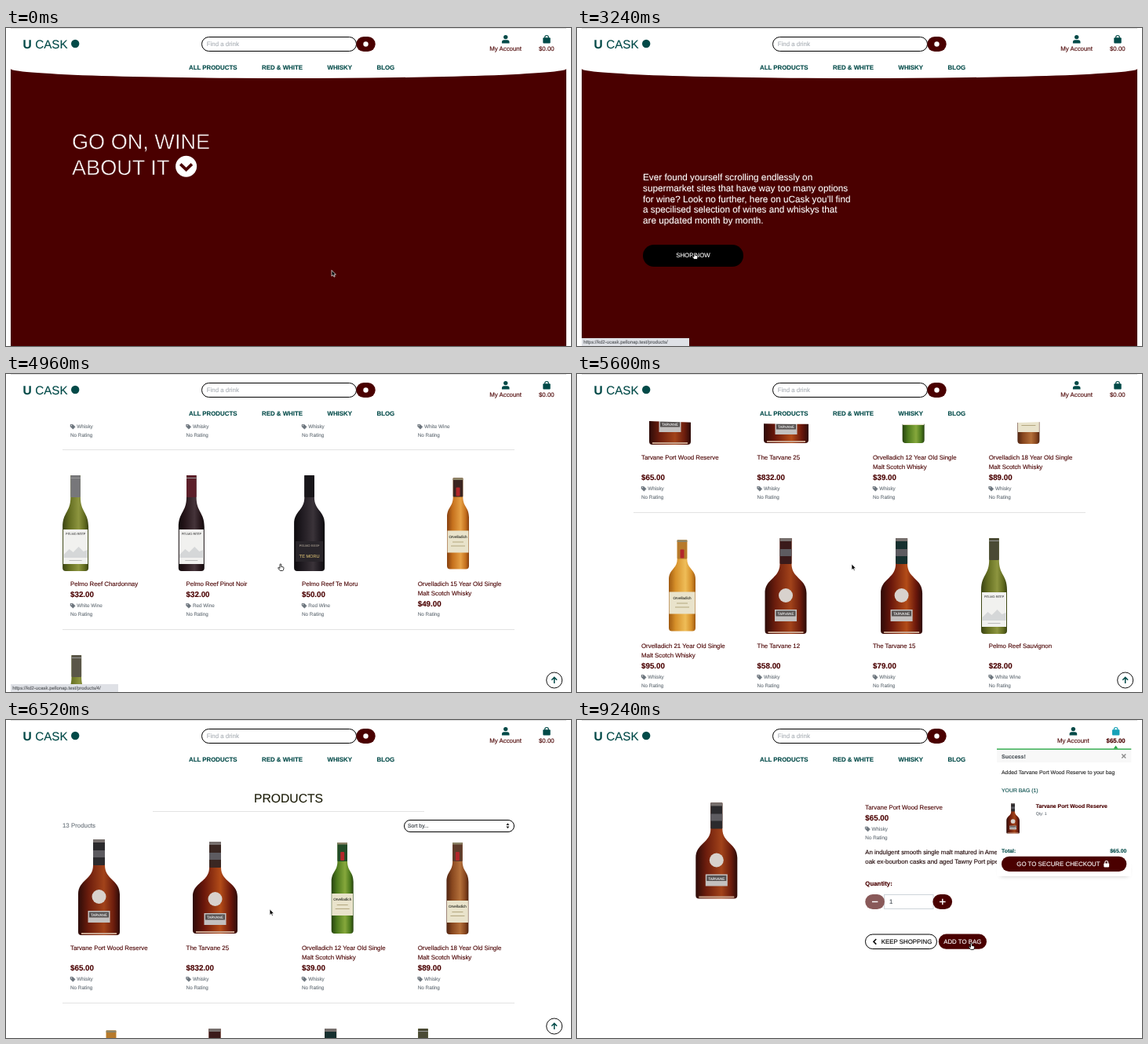
These frames come from a looping animation (720x405 px, 9760 ms). An HTML page:

```html
<!DOCTYPE html>
<html lang="en">
<head>
<meta charset="utf-8">
<title>Wine shop</title>
<style>
  html, body { margin: 0; width: 100%; height: 100%; overflow: hidden; background: #fff; }
  svg { display: block; width: 100vw; height: 100vh; }
  text { font-family: "Liberation Sans", Arial, sans-serif; text-rendering: geometricPrecision; white-space: pre; }
</style>
</head>
<body>
<svg id="stage" viewBox="0 0 720 405" xmlns="http://www.w3.org/2000/svg"></svg>
<script>
const LOOP = 9760, STEP = 40;
const MAROON = '#4a0000', TEAL = '#024a48', GREY = '#6c757d';
const BASE = 7.87, SMALL = 6.88, TINY = 6.35;
const SITE = 'https://kd2-ucask.pellonap.test/';

// ---------- drawing helpers ----------
const glyphs = (x, y, size, fill, str, stroke, width, more) =>
  `<text x="${x}" y="${y}" font-size="${size}" fill="${fill}" stroke="${stroke}" stroke-width="${width}" ${more}>${str}</text>`;
const text = (x, y, size, fill, str, more = '') => glyphs(x, y, size, fill, str, fill, .12, more);
const bold = (x, y, size, fill, str, more = '') => text(x, y, size, fill, str, 'font-weight="700" ' + more);
const light = (x, y, size, fill, bg, str) => glyphs(x, y, size, fill, str, bg, .5, '');
const rect = (x, y, w, h, fill, more = '') =>
  `<rect x="${x}" y="${y}" width="${w}" height="${h}" fill="${fill}" ${more}/>`;
const pill = (x, y, w, h, fill, more = '') => rect(x, y, w, h, fill, `rx="${h / 2}" ${more}`);
const disc = (x, y, r, fill, more = '') => `<circle cx="${x}" cy="${y}" r="${r}" fill="${fill}" ${more}/>`;
const path = (d, fill, more = '') => `<path d="${d}" fill="${fill}" ${more}/>`;
const line = (d, colour, width) => path(d, 'none', `stroke="${colour}" stroke-width="${width}"`);
const at = (x, y, body, scale = 1) => `<g transform="translate(${x} ${y}) scale(${scale})">${body}</g>`;
const group = (id, body) => `<g id="${id}">${body}</g>`;
const rule = (x1, x2, y) => rect(x1, y, x2 - x1, 1, '#e3e3e3');

// ---------- bottles ----------
const GLASS = {
  red: ['#2c0b08', '#6c1d0d', '#a2431a'], ruby: ['#2e0a08', '#6a170b', '#b34c18'],
  green: ['#26420f', '#4d7a1d', '#86a83c'], brown: ['#4f2411', '#88471f', '#b4703a'],
  amber: ['#87400f', '#c5701d', '#e6a044'], gold: ['#a05a10', '#d6902a', '#efbd58'],
  olive: ['#3a4313', '#626c20', '#8d953f'], dark: ['#0d0b0e', '#1f1a20', '#3a3339'],
  wine: ['#120a0c', '#26161a', '#45343a']
};
const gradients = Object.entries(GLASS).map(([id, [edge, mid, shine]]) =>
  `<linearGradient id="${id}"><stop offset="0" stop-color="${edge}"/><stop offset=".25" stop-color="${mid}"/>
   <stop offset=".62" stop-color="${shine}"/><stop offset=".85" stop-color="${mid}"/><stop offset="1" stop-color="${edge}"/></linearGradient>`).join('');

// w, n: half widths of body and neck; a, b: where the shoulder starts and ends
function bottle({ w, n, h, a, b, glass, cap, capH }, extra) {
  const m = (a + b) / 2, r = 4;
  const d = `M${-n} 0H${n}V${a}C${n} ${m} ${w} ${m} ${w} ${b}V${h - r}Q${w} ${h} ${w - r} ${h}H${r - w}` +
    `Q${-w} ${h} ${-w} ${h - r}V${b}C${-w} ${m} ${-n} ${m} ${-n} ${a}Z`;
  return path(d, `url(#${glass})`) + rect(-n, 0, 2 * n, capH, cap, 'rx="1"') + extra;
}
const tiny = (y, size, fill, str) => text(0, y, size, fill, str, 'text-anchor="middle"');

function decanter(glass = 'red', cap = '#2b2a2d', h = 122, w = 26.5) {
  return bottle({ w, n: 7.5, h, a: 33, b: 70, glass, cap, capH: 33 },
    rect(-7.5, 0, 15, 4, '#77706e') + rect(-7.5, 14, 15, 9, '#5d5b60') +
    disc(0, 73, 9, '#d8d2cd') + rect(-14, 91, 28, 15, '#c3c0bf') + rect(-12.5, 92.5, 25, 7, '#55504f') +
    tiny(98, 4.6, '#eee', 'TARVANE') + rect(4 - w, h - 3, 2 * w - 8, 2, '#c9a48e'));
}
function malt(glass, cap, labelY, h = 116, w = 14) {
  return bottle({ w, n: 6.3, h, a: 24, b: 50, glass, cap, capH: 24 },
    rect(-6.3, 0, 12.6, 2.5, '#8c8468') + rect(-2.5, 12, 5, 11, '#b3262a', 'rx="1"') +
    rect(-w + .5, labelY, 2 * w - 1, 28, '#e9e3cb') + tiny(labelY + 9, 4.6, '#33342a', 'Orvelladich') +
    rect(-7, labelY + 14, 14, 1, '#b3a77f') + rect(-9, labelY + 19, 18, 1, '#b3a77f'));
}
function wine(glass, cap) {
  return bottle({ w: 16.5, n: 6.3, h: 122, a: 28, b: 66, glass, cap, capH: 28 },
    rect(-6.3, 3, 12.6, 1, '#999') + rect(-15.5, 69, 31, 44, '#f1f1ef') +
    path('M-15 101L-8 94L-3 98L4 91L10 97L15 95V105H-15Z', '#d5d7d8') + tiny(76, 3.9, '#666', 'PELMO REEF') +
    rect(-8, 108, 16, 1, '#bbb'));
}
function reserve() {
  return bottle({ w: 19.5, n: 6.3, h: 122, a: 28, b: 62, glass: 'dark', cap: '#18161a', capH: 28 },
    rect(-17.5, 84, 35, 26, '#29252a') + tiny(91, 4, '#9a9186', 'PELMO REEF') + tiny(105, 5.6, '#c3ab6a', 'TE MORU'));
}

// ---------- shared page parts ----------
const person = (x, y) => disc(x, y + 2.6, 2.7, TEAL) +
  path(`M${x - 4.8} ${y + 10.4}V${y + 9}Q${x - 4.8} ${y + 6.2} ${x - 2} ${y + 6.2}H${x + 2}Q${x + 4.8} ${y + 6.2} ${x + 4.8} ${y + 9}V${y + 10.4}Z`, TEAL);
const bag = (x, colour) => rect(x - 4.7, 12.2, 9.4, 7.3, colour, 'rx="1"') +
  line(`M${x - 2.3} 14V11.8A2.3 2.3 0 0 1 ${x + 2.3} 11.8V14`, colour, 1.2);
const tag = path('M0 .4H3L6.2 3.4L3.4 6.3L0 3.2Z', GREY, 'stroke="#6c757d" stroke-width=".5" stroke-linejoin="round"') + disc(1.5, 1.8, .6, '#fff');
const meta = (x, y, cat) => (cat ? at(x, y - 5.4, tag) + text(x + 8.3, y, TINY, GREY, cat) : '') +
  text(x, y + 10.8, TINY, GREY, 'No Rating');

const header =
  path('M6 1H714V52A354 12 0 0 1 6 52Z', '#fff') +
  bold(21.6, 25.7, 15.5, TEAL, 'U') + text(37.2, 25.7, 15.2, TEAL, 'CASK') + disc(88.2, 20, 5.2, TEAL) +
  pill(249.5, 11.5, 197, 18, '#fff', 'stroke="#000"') + text(255.8, 23, BASE, '#a8aeb4', 'Find a drink') +
  pill(446.3, 11, 24.4, 19, MAROON) + disc(458.5, 20.5, 3.2, '#fff') +
  [[233, 'ALL PRODUCTS'], [326, 'RED &amp; WHITE'], [409.5, 'WHISKY'], [472.5, 'BLOG']]
    .map(([x, s]) => bold(x, 52.7, BASE, TEAL, s)).join('') +
  group('emptyBag', person(636.7, 9) + text(616.3, 29.3, BASE, MAROON, 'My Account') +
    bag(689, TEAL) + text(679, 29.3, BASE, MAROON, '$0.00')) +
  group('fullBag', person(632.4, 9) + text(612, 29.3, BASE, MAROON, 'My Account') +
    bag(686.7, '#17a2b8') + bold(674.6, 29.3, BASE, MAROON, '$65.00'));

// ---------- home ----------
const pitch = [
  'Ever found yourself scrolling endlessly on',
  'supermarket sites that have way too many options',
  'for wine? Look no further, here on uCask you’ll find',
  'a specilised selection of wines and whiskys that',
  'are updated month by month.'
];
const home =
  light(84, 153.8, 27.1, '#fff', MAROON, 'GO ON, WINE') + light(84, 186.6, 27.1, '#fff', MAROON, 'ABOUT IT') +
  disc(229.6, 176.3, 13.5, '#fff') + line('M222.3 173.4L229.6 180.4L236.9 173.4', MAROON, 3.8) +
  pitch.map((s, i) => text(84, 440 + i * 13.75, 11.75, '#fff', s)).join('') +
  pill(84, 522, 128, 28, '#000') + text(126.2, 538.4, BASE, '#fff', 'SHOP NOW');

// ---------- product list ----------
const COLS = [82, 229.6, 377, 524.7];
const item = (col, y, names, price, cat, priceY, metaY) => {
  const x = COLS[col];
  return names.map((s, i) => text(x, y + i * 11.9, BASE, MAROON, s)).join('') +
    bold(x, priceY, 9.8, MAROON, price) + meta(x, metaY, cat);
};
const tall = (col, y, names, price, cat) => item(col, y, names, price, cat, y + 25.7, y + 39);
const flat = (col, y, names, price, cat) => item(col, y, names, price, cat, y + 13.9, y + 27.3);
const SCOTCH = 'Malt Scotch Whisky';
const list =
  text(360, 104.8, 15.7, '#1c1c08', 'PRODUCTS', 'text-anchor="middle"') + rule(187, 533, 116) +
  text(72, 137, BASE, GREY, '13 Products') +
  pill(507.5, 127.5, 140, 15, '#fff', 'stroke="#000"') + text(512, 137, 6.8, '#343a40', 'Sort by...') +
  path('M637.4 134L639.4 131.2L641.4 134ZM637.4 135.4L639.4 138.2L641.4 135.4Z', '#222') +
  at(118.5, 152, decanter()) + at(266.5, 155, decanter('ruby', '#3a2722', 117, 28.5)) +
  at(428.7, 156, malt('green', '#224b27', 65)) + at(575.4, 156, malt('brown', '#5e3b2a', 74, 117)) +
  tall(0, 293.3, ['Tarvane Port Wood Reserve'], '$65.00', 'Whisky') +
  tall(1, 293.3, ['The Tarvane 25'], '$832.00', 'Whisky') +
  tall(2, 293.3, ['Orvelladich 12 Year Old Single', SCOTCH], '$39.00', 'Whisky') +
  tall(3, 293.3, ['Orvelladich 18 Year Old Single', SCOTCH], '$89.00', 'Whisky') + rule(72, 648, 360) +
  at(134, 395.5, malt('gold', '#b77a2b', 66, 116, 17)) + at(266, 393, decanter('red', '#3a1a1a')) +
  at(413.6, 393, decanter('ruby', '#16302f')) + at(531.5, 393, wine('olive', '#4a4a35')) +
  tall(0, 533.3, ['Orvelladich 21 Year Old Single', SCOTCH], '$95.00', 'Whisky') +
  tall(1, 533.3, ['The Tarvane 12'], '$58.00', 'Whisky') +
  tall(2, 533.3, ['The Tarvane 15'], '$79.00', 'Whisky') +
  tall(3, 533.3, ['Pelmo Reef Sauvignon'], '$28.00', 'White Wine') + rule(72, 648, 599) +
  at(88.6, 632, wine('olive', '#77777a')) + at(236.3, 632, wine('wine', '#5c1f2a')) +
  at(386.6, 632, reserve()) + at(576, 635.5, malt('amber', '#3b2521', 67)) +
  flat(0, 773, ['Pelmo Reef Chardonnay'], '$32.00', 'White Wine') +
  flat(1, 773, ['Pelmo Reef Pinot Noir'], '$32.00', 'Red Wine') +
  flat(2, 773, ['Pelmo Reef Te Moru'], '$50.00', 'Red Wine') +
  item(3, 773, ['Orvelladich 15 Year Old Single', SCOTCH], '$49.00', '', 798.5, 800.3) + rule(72, 648, 828) +
  at(89.8, 861, wine('olive', '#5a5648'));
const upButton = disc(698.7, 390, 10, '#fff', 'stroke="#111"') + line('M698.7 394V386.6M695.3 389.8L698.7 386.4L702.1 389.8', TEAL, 1.5);

// ---------- product detail ----------
const detail =
  at(177.8, 105.5, decanter()) +
  text(367.3, 113.9, BASE, MAROON, 'Tarvane Port Wood Reserve') + bold(367.3, 127.7, 9.8, MAROON, '$65.00') +
  meta(367.3, 141, 'Whisky') +
  text(367.3, 171.3, BASE, '#1c0000', 'An indulgent smooth single malt matured in American white') +
  text(367.3, 183.3, BASE, '#1c0000', 'oak ex-bourbon casks and aged Tawny Port pipes.') +
  bold(367.3, 210.8, BASE, MAROON, 'Quantity:') +
  rect(391.5, 222.5, 62.5, 18, '#fff', 'stroke="#ced4da"') + text(398, 234.3, BASE, '#495057', '1') +
  pill(367.3, 222, 24.7, 19, '#895959') + line('M376 231.5H383.4', '#fff', 1.4) +
  pill(453.4, 222, 24.7, 19, MAROON) + line('M462 231.5H469.6M465.8 227.7V235.3', '#fff', 1.4) +
  pill(367.5, 273, 91, 18.5, '#fff', 'stroke="#000"') + line('M381.3 279L378 282.3L381.3 285.6', '#000', 1.5) +
  text(387.8, 285.1, BASE, '#000', 'KEEP SHOPPING') +
  pill(460.8, 272.6, 61.2, 19.2, MAROON) + text(467.2, 285.1, BASE, '#fff', 'ADD TO BAG');

const toast =
  rect(540, 186, 162, 12, '#000', 'opacity=".3" filter="url(#soft)"') +
  rect(535, 37, 171.3, 162, '#fff') + rect(535, 38, 171.3, 16, '#f8f8f8') + rect(535, 36.4, 171.3, 1.4, '#28a745') +
  path('M683.8 36.6L686.6 32.6L689.4 36.6Z', '#28a745') +
  bold(541, 48.6, 7, '#495057', 'Success!') + line('M694.3 43.4L699.3 48.4M699.3 43.4L694.3 48.4', '#8b8b8b', 1.4) +
  text(541, 69, SMALL, '#222', 'Added Tarvane Port Wood Reserve to your bag') +
  text(541, 92, SMALL, TEAL, 'YOUR BAG (1)') + at(555.6, 106, decanter(), .315) +
  bold(584.8, 111.9, SMALL, MAROON, 'Tarvane Port Wood Reserve') + text(584.8, 121, 5.2, GREY, 'Qty: 1') +
  bold(541, 169.2, SMALL, TEAL, 'Total:') + bold(700.3, 169.2, SMALL, TEAL, '$65.00', 'text-anchor="end"') +
  pill(541, 173.8, 159.3, 19.2, MAROON) + text(560.3, 186.2, BASE, '#fff', 'GO TO SECURE CHECKOUT') +
  rect(671.3, 182.5, 6.8, 4.9, '#fff', 'rx=".8"') + line('M672.8 183V181.4A1.9 1.9 0 0 1 676.6 181.4V183', '#fff', 1.1);

// ---------- pointers ----------
const arrow = path('M0 0V7.6L1.8 6L3 8.6L4.2 8L3.1 5.6H5.4Z', '#000', 'stroke="#fff" stroke-width=".7"');
const hand = path('M-1 .8A.9 .9 0 0 1 .8 .8V3.4L3.2 3.9Q4.2 4.2 4 5.2L3.5 7.6Q3.3 8.5 2.5 8.5H-.3Q-1 8.5-1.4 7.8L-3.2 5.2Q-3.4 4.2-2.5 4.4L-1 5.4Z',
  '#fff', 'stroke="#000" stroke-width=".8" stroke-linejoin="round"');
const BEAM = 'M-1.8 .6Q0 .6 0 2V7.4Q0 8.8-1.8 8.8M1.8 .6Q0 .6 0 2V7.4Q0 8.8 1.8 8.8';
const beam = line(BEAM, '#fff', 1.5) + line(BEAM, '#000', .8);

const stage = document.getElementById('stage');
stage.innerHTML =
  `<defs>${gradients}<clipPath id="view">${rect(6, 0, 708, 405, '#000')}</clipPath>` +
  `<filter id="soft" x="-20%" y="-100%" width="140%" height="300%"><feGaussianBlur stdDeviation="3"/></filter></defs>` +
  `<g clip-path="url(#view)">` + rect(6, 0, 708, 405, MAROON) + group('home', home) +
  group('paper', rect(6, 1, 708, 500, '#fff')) + group('list', list) + group('detail', detail) +
  group('header', header) + group('up', upButton) + group('toast', toast) +
  rect(709.6, 2, 3.4, 252, '#fff', 'id="thumb" rx="1.7"') + rect(6, 0, 708, 1, '#dedede') +
  group('status', rect(6, 395, 137, 10, '#dfe1e6', 'id="statusBox"') +
    text(8.2, 402.2, 6, '#55585c', '', 'id="statusText"')) + `</g>` +
  group('cursor', group('arrow', arrow) + group('hand', hand) + group('beam', beam));

// ---------- timeline ----------
const OPEN_LIST = 3280, OPEN_DETAIL = 7760, ADDED = 9080;
const POINTER = [[440, 415, 308.5], [600, 234.5, 179], [2040, 234.5, 179], [2480, 150, 286], [3360, 150, 286],
  [3720, 350, 242], [6400, 350, 242], [7200, 121, 223], [8120, 121, 223], [8720, 502.5, 284]];
const HANDS = [[760, 1960], [2440, OPEN_LIST], [4000, 5360], [7120, OPEN_DETAIL], [8680, LOOP]];
const BEAMS = [[1960, 2240]];
const HOME_SCROLL = [[1200, 0], [1900, 246]];
// a nudge, a rest, a flick down, then a flick up that bounces past the start
const LIST_SCROLL = [[3760, 0], [4000, 46], [4320, 46], [5180, 535], [5360, 535], [5960, -14], [6040, -10], [6360, 0]];
const THUMB = [[1200, 0], [1280, .5], [2280, .5], [2440, 0]];
const TOAST = [[ADDED, 0], [9240, 1]];
const LINKS = [[1040, 2160, '#home_text', 235], [2480, OPEN_LIST, 'products/', 137],
  [4000, 5440, 'products/4/', 137], [7200, 8080, 'products/3/', 136]];

const smooth = u => u * u * (3 - 2 * u);
const easeOut = u => u * (2 - u);

function tween(rows, t, ease = smooth) {
  const i = rows.findIndex(r => r[0] > t);
  if (i === 0) return rows[0].slice(1);
  if (i < 0) return rows[rows.length - 1].slice(1);
  const p = rows[i - 1], q = rows[i], e = ease((t - p[0]) / (q[0] - p[0]));
  return p.slice(1).map((v, k) => v + (q[k + 1] - v) * e);
}

const el = id => document.getElementById(id);
const show = (id, on) => { el(id).style.display = on ? '' : 'none'; };
const move = (id, x, y) => el(id).setAttribute('transform', `translate(${x} ${y})`);
const within = t => ([from, to]) => t >= from && t < to;

function draw(t) {
  const isHome = t < OPEN_LIST, isDetail = t >= OPEN_DETAIL, isList = !isHome && !isDetail;
  show('home', isHome);
  show('paper', !isHome);
  show('list', isList);
  show('up', isList);
  show('detail', isDetail);
  show('emptyBag', t < ADDED);
  show('fullBag', t >= ADDED);

  const homeY = Math.round(tween(HOME_SCROLL, t)[0]);
  const listY = isList ? Math.round(tween(LIST_SCROLL, t, easeOut)[0]) : 0;
  const bounce = Math.max(0, -listY);
  move('home', 0, -homeY);
  move('list', 0, -listY);
  for (const id of ['paper', 'header', 'up']) move(id, 0, bounce);

  el('thumb').setAttribute('y', isHome ? 2 + homeY / 246 * 151 : 2);
  el('thumb').setAttribute('opacity', isHome ? tween(THUMB, t)[0] : bounce ? .5 : 0);
  el('toast').setAttribute('opacity', tween(TOAST, t)[0]);

  const link = LINKS.find(within(t));
  show('status', link);
  if (link) {
    el('statusText').textContent = SITE + link[2];
    el('statusBox').setAttribute('width', link[3]);
  }

  const isHand = HANDS.some(within(t)), isBeam = BEAMS.some(within(t));
  show('hand', isHand);
  show('beam', isBeam);
  show('arrow', !isHand && !isBeam);
  move('cursor', ...tween(POINTER, t));
}

const start = performance.now();
function tick() {
  const t = (performance.now() - start) % LOOP;
  draw(Math.floor(t / STEP) * STEP);
  requestAnimationFrame(tick);
}
tick();
</script>
</body>
</html>
```
